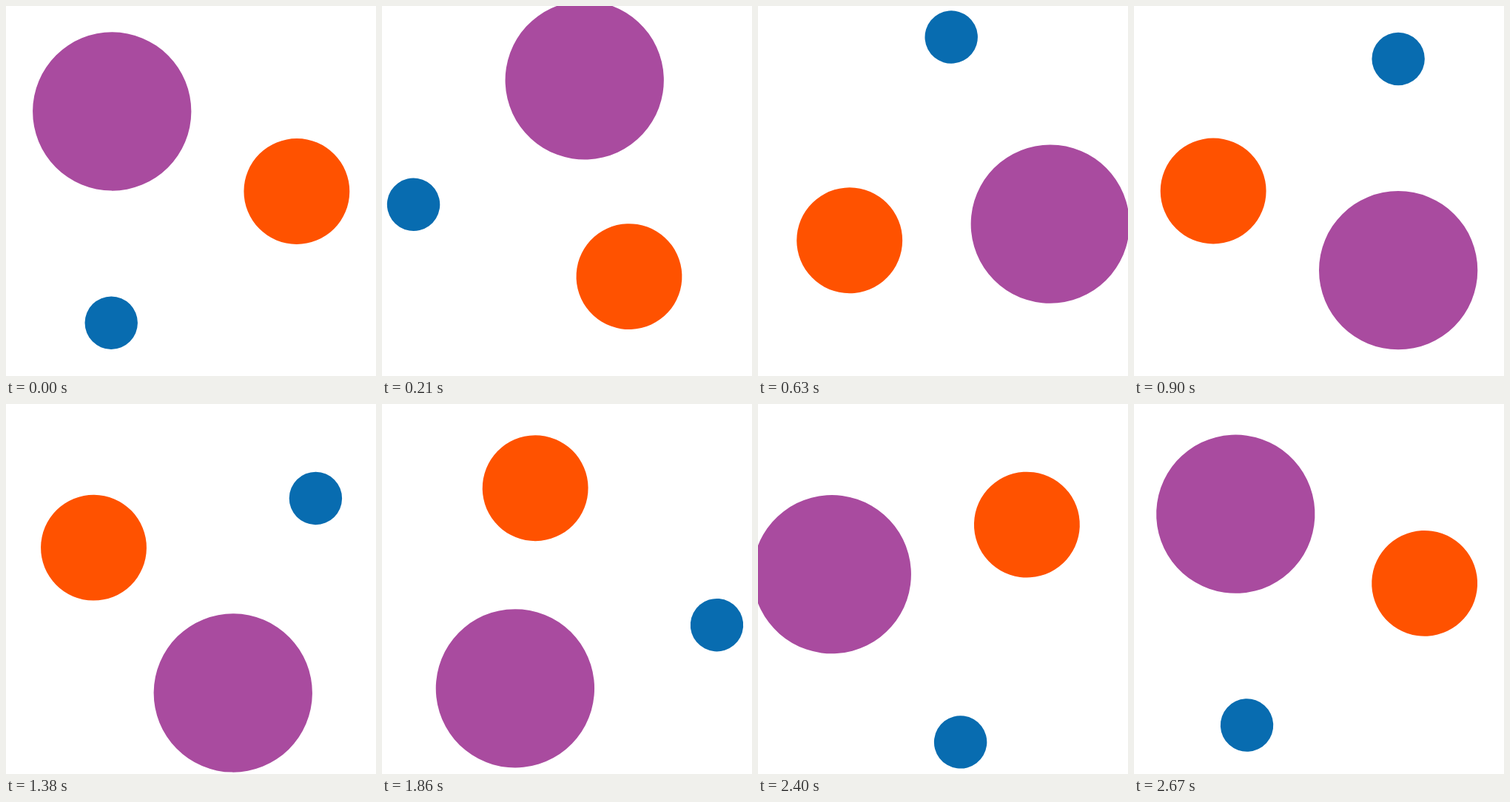
An HTML page for the animation above (2.7 s loop, 500 by 500 pixels).

```html
<!DOCTYPE html>
<html lang="en">
<head>
<meta charset="utf-8">
<title>Orbiting circles</title>
<style>
  html, body { margin: 0; height: 100%; overflow: hidden; background: #fff; }
  svg { display: block; width: 100%; height: 100%; }
</style>
</head>
<body>
<svg viewBox="-7 -7 14 14">
  <g id="orbit">
    <circle cx="-3" cy="-3" r="3" fill="#a94b9f"/>
    <circle cx="4" cy="0" r="2" fill="#ff5200"/>
    <circle cx="-3" cy="5" r="1" fill="#086cb0"/>
  </g>
</svg>
<script>
const LOOP = 2700, TURN = 900;
const orbit = document.getElementById('orbit');

const bezier = (a, b, s) => 3 * a * s * (1 - s) ** 2 + 3 * b * s * s * (1 - s) + s ** 3;

// Cubic-bezier easing (.333, 0, .833, .833): starts at rest, leaves at speed
function easeIn(x) {
  let lo = 0, hi = 1;
  for (let i = 0; i < 30; i++) {
    const mid = (lo + hi) / 2;
    if (bezier(.333, .833, mid) < x) lo = mid; else hi = mid;
  }
  return bezier(0, .833, lo);
}

// Fast half turn that slows to a stop, then a slower half turn that speeds up
function angleAt(time) {
  return time < TURN
    ? 180 * (1 - easeIn(1 - time / TURN))
    : 180 * (1 + easeIn((time - TURN) / (LOOP - TURN)));
}

function draw() {
  orbit.setAttribute('transform', `rotate(${angleAt(performance.now() % LOOP)})`);
  requestAnimationFrame(draw);
}
draw();
</script>
</body>
</html>
```
